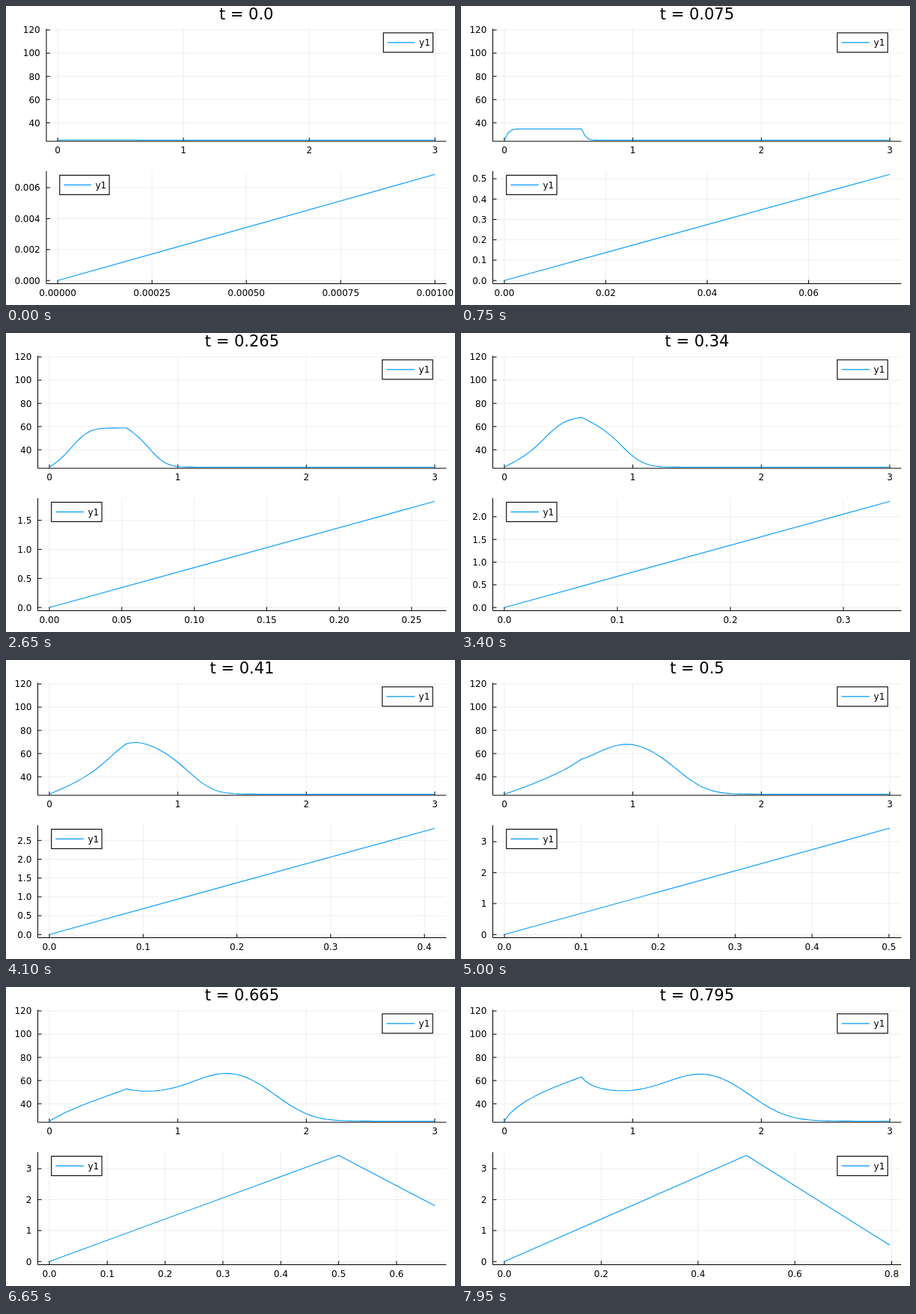
Write an HTML page that moves like this. It is 600x400 px and loops after 8000 ms.

```html
<!DOCTYPE html>
<html lang="en">
<head>
<meta charset="utf-8">
<title>Temperature and velocity</title>
<style>
  html, body { margin: 0; width: 100%; height: 100%; overflow: hidden; background: #fff; }
  svg { display: block; width: 600px; height: 400px; }
  text { font: 12px "DejaVu Sans", sans-serif; fill: #000; }
  .title { font-size: 21px; }
  .axis { stroke: #000; stroke-width: 1; fill: none; }
  .grid { stroke: #000; stroke-opacity: .07; stroke-width: 1; fill: none; }
  .line { stroke: #009afa; stroke-width: 1.1; fill: none; stroke-linejoin: round; }
  .box { stroke: #000; stroke-width: 1.1; fill: #fff; }
</style>
</head>
<body>
<svg id="stage" viewBox="0 0 600 400"></svg>
<script>
const stage = document.getElementById('stage');
const FRAMES = 160, FRAME_MS = 50, STEPS = 5, DT = 0.001;
const CELLS = 100, DX = 0.03, HEATED = 20, AMBIENT = 25, HEAT = 127;
const RIGHT = 588.4, HEIGHT = 150.5;
const TOP = { y0: 30.5, y1: 181 }, BOTTOM = { y0: 221, y1: 371.5 };

const velocity = t => t <= 0.5 ? 6.86 * t : 3.43 - 9.8 * (t - 0.5);

// Upwind transport of a fluid that is heated over the first cells
function simulate() {
  const out = [];
  let temp = new Array(CELLS + 1).fill(AMBIENT);
  for (let n = 0; n <= (FRAMES - 1) * STEPS; n++) {
    const c = velocity(n * DT) * DT / DX;
    temp = temp.map((v, i) => i === 0 ? AMBIENT
      : v - c * (v - temp[i - 1]) + (i <= HEATED ? HEAT * DT : 0));
    if (n % STEPS === 0) out.push(temp);
  }
  return out;
}
const profiles = simulate();

const pad = (lo, hi) => [lo - 0.03 * (hi - lo), hi + 0.03 * (hi - lo)];

// Pick the tick step with the best mix of count, coverage and niceness
function ticks([lo, hi]) {
  const span = hi - lo, order = Math.floor(Math.log10(span));
  const nice = [[5, 0.9], [3, 0.2], [2.5, 0.5], [2, 0.7], [1, 1]];
  let best = null, high = -Infinity;
  for (let z = order; z >= order - 1; z--) {
    for (const [q, quality] of nice) {
      const step = q * 10 ** z;
      const first = Math.ceil(lo / step), last = Math.floor(hi / step + 1e-9);
      const count = last - first + 1;
      if (count < 4 || count > 8) continue;
      const score = (1 - Math.abs(count - 5) / 5) / 4
        + 0.5 * span / ((count - 1) * step) + quality / 4;
      if (score > high + 1e-9) {
        high = score;
        const digits = Math.max(0, -z + (q === 2.5 ? 1 : 0));
        best = Array.from({ length: count }, (_, i) => {
          const value = (first + i) * step;
          return { value, label: Math.abs(value).toFixed(digits) };
        });
      }
    }
  }
  return best;
}

const plain = values => values.map(value => ({ value, label: String(value) }));
const textWidth = s => [...s].reduce((w, ch) => w + (ch === '.' ? 3.814 : 7.634), 0);
const f = n => n.toFixed(2);
const path = (cls, d) => `<path class="${cls}" d="${d}"/>`;
const text = (x, y, s, anchor, cls = '') =>
  `<text class="${cls}" x="${f(x)}" y="${f(y)}" text-anchor="${anchor}">${s}</text>`;

function legend(left, y0, side) {
  const w = RIGHT - left, width = w * 0.0965 + 14.7;
  const x = side === 'left' ? left + w / 30 : RIGHT - w / 30 - width;
  const mid = y0 + 18.4, a = x + w / 96, b = a + w / 14.6;
  return `<rect class="box" x="${f(x)}" y="${f(mid - 13)}" width="${f(width)}" height="26"/>`
    + path('line', `M${f(a)} ${f(mid)}H${f(b)}`)
    + text(b + w / 96, mid + 4.3, 'y1', 'start');
}

function plot({ y0, y1 }, left, xlim, ylim, xticks, yticks, points, side) {
  const sx = v => left + (v - xlim[0]) / (xlim[1] - xlim[0]) * (RIGHT - left);
  const sy = v => y1 - (v - ylim[0]) / (ylim[1] - ylim[0]) * HEIGHT;
  let grid = '', axis = `M${f(left)} ${y0}V${y1}H${RIGHT}`, labels = '';
  for (const { value, label } of xticks) {
    const x = f(sx(value));
    grid += `M${x} ${y0}V${y1}`;
    axis += `M${x} ${y1}v-5`;
    labels += text(+x, y1 + 16.2, label, 'middle');
  }
  for (const { value, label } of yticks) {
    const y = f(sy(value));
    grid += `M${f(left)} ${y}H${RIGHT}`;
    axis += `M${f(left)} ${y}h5`;
    labels += text(left - 8.2, +y + 4.4, label, 'end');
  }
  const curve = 'M' + points.map(([x, y]) => f(sx(x)) + ' ' + f(sy(y))).join('L');
  return path('grid', grid) + path('axis', axis) + labels
    + path('line', curve) + legend(left, y0, side);
}

function draw(i) {
  const t = i * STEPS * DT, end = t + DT;
  const peak = velocity(Math.min(end, 0.5));
  const xlim = pad(0, end), ylim = pad(0, peak);
  const yticks = ticks(ylim), topTicks = plain([40, 60, 80, 100, 120]);
  const widest = Math.max(...[...yticks, ...topTicks].map(k => textWidth(k.label)));
  const left = 19.6 + widest;

  const heat = profiles[i].map((v, k) => [k * DX, v]);
  const speed = [[0, 0]];
  if (end > 0.5) speed.push([0.5, 3.43]);
  speed.push([end, velocity(end)]);

  const name = t === 0 ? '0.0' : String(+t.toFixed(3));
  stage.innerHTML = text((left + RIGHT) / 2, 18.1, 't = ' + name, 'middle', 'title')
    + plot(TOP, left, pad(0, 3), [24, 121], plain([0, 1, 2, 3]), topTicks, heat, 'right')
    + plot(BOTTOM, left, xlim, ylim, ticks(xlim), yticks, speed, end > 0.7605 ? 'right' : 'left');
}

const start = performance.now();
let shown = -1;
function tick() {
  const i = Math.floor((performance.now() - start) / FRAME_MS) % FRAMES;
  if (i !== shown) draw(shown = i);
  requestAnimationFrame(tick);
}
tick();
</script>
</body>
</html>
```
